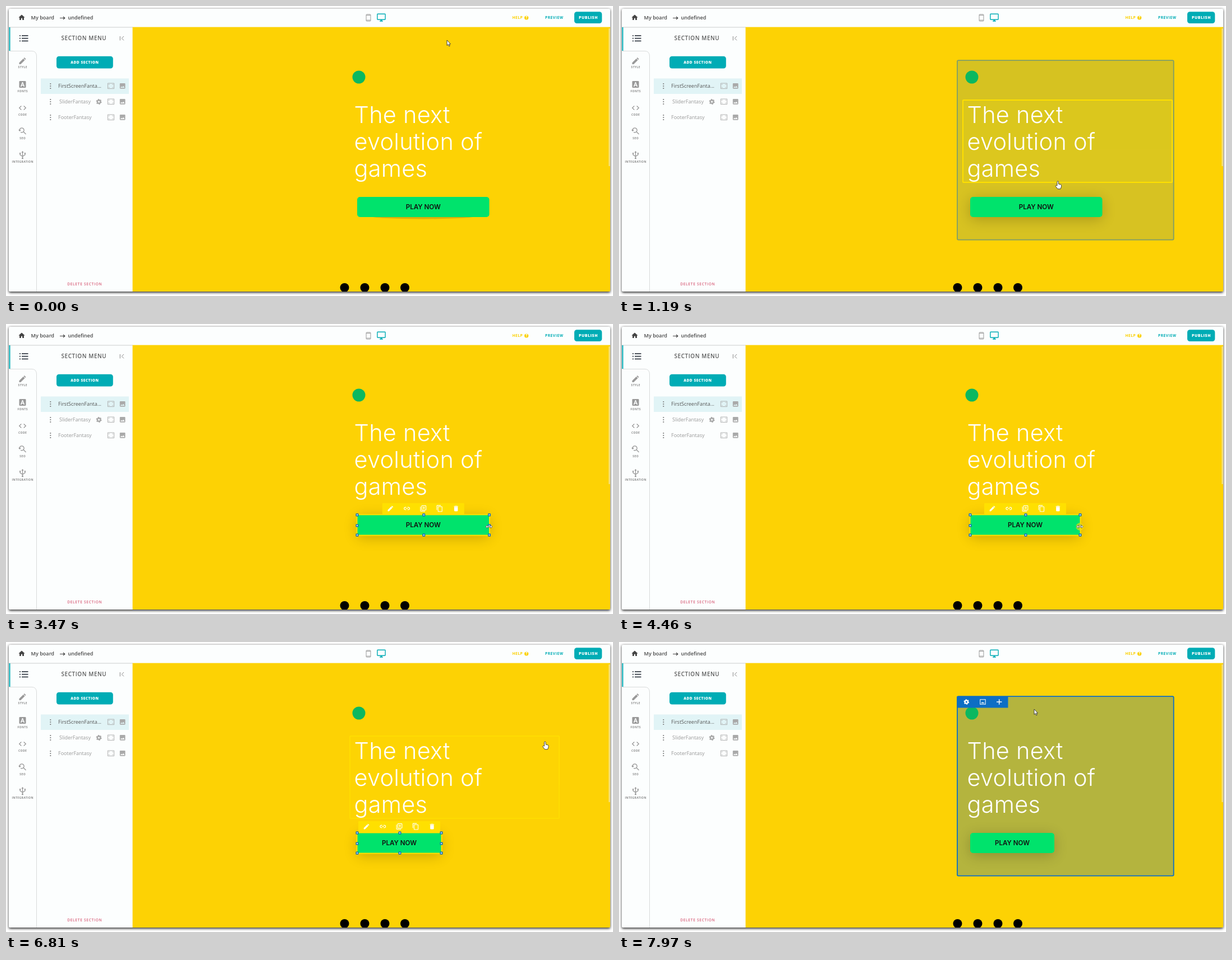
An HTML page for the animation above (8000 ms loop, 1082x518 px).

```html
<!DOCTYPE html>
<html lang="en">
<head>
<meta charset="utf-8">
<title>Section editor</title>
<style>
  html, body { margin: 0; width: 100%; height: 100%; overflow: hidden; background: #fff; }
  svg { display: block; }
  #stage { width: 100%; height: 100%; }
  text { font-family: "Open Sans", sans-serif; }
  .mont { font-family: Inter, sans-serif; }
</style>
</head>
<body>
<svg id="stage" viewBox="0 0 1082 518"></svg>
<script>
const TEAL = '#00acb5', BLUE = '#0d6ec4', GREY = '#999', LEMON = '#ffe000';

// Icons on a 24-unit grid; "F" paths are filled, "S" paths are stroked.
const F = d => `<path d="${d}" fill="currentColor" fill-rule="evenodd"/>`;
const S = (d, w = 2) => `<path d="${d}" fill="none" stroke="currentColor" stroke-width="${w}"/>`;
const ring = (r, w, dash = '') =>
  `<circle cx="12" cy="12" r="${r}" fill="none" stroke="currentColor" stroke-width="${w}" stroke-dasharray="${dash}"/>`;
const icons = {
  home: F('M10 20v-6h4v6h5v-8h3L12 3 2 12h3v8z'),
  phone: S('M7 2h10a1.500 1.500 0 0 1 1.500 1.500v17a1.500 1.500 0 0 1-1.500 1.500H7a1.500 1.500 0 0 1-1.500-1.500v-17A1.500 1.500 0 0 1 7 2zM5.500 4.500h13M5.500 19h13', 1.6),
  desktop: F('M21 2H3a2 2 0 0 0-2 2v12a2 2 0 0 0 2 2h7v2H8v2h8v-2h-2v-2h7a2 2 0 0 0 2-2V4a2 2 0 0 0-2-2zm0 14H3V4h18z'),
  pencil: F('M3 17v4h4L18 10l-4-4zM21 7l-4-4-2 2 4 4z'),
  fonts: F('M5 3h14a2 2 0 0 1 2 2v14a2 2 0 0 1-2 2H5a2 2 0 0 1-2-2V5a2 2 0 0 1 2-2zM11 6 6.5 18H9l1-2.7h4l1 2.7h2.5L13 6zM10.6 13.2 12 9l1.4 4.2z'),
  code: F('M9.4 16.6 4.8 12l4.6-4.6L8 6l-6 6 6 6zM14.6 16.6l4.6-4.6-4.6-4.6L16 6l6 6-6 6z'),
  search: S('M4 11a6 6 0 1 1 3 4.5M14 14l7 7M2 9l2 3 3-2'),
  plug: S('M12 4v17M5.500 8v4l6.500 4M18.500 8v4l-6.500 4') + F('M9 6l3-5 3 5zM4 6h3v4H4zM17 6h3v4h-3zM10 19h4v4h-4z'),
  image: F('M21 19V5a2 2 0 0 0-2-2H5a2 2 0 0 0-2 2v14a2 2 0 0 0 2 2h14a2 2 0 0 0 2-2zM8.5 13.500l2.500 3 3.500-4.500 4.500 6H5z'),
  picture: S('M3 4h18v16H3z') + F('M6 17l4-5 2.500 3 2-2 3.500 4z'),
  gear: ring(9, 4, '4.71') + ring(6, 5),
  plus: S('M12 3v18M3 12h18', 2.6),
  expand: S('M2 3.500h20v17H2z', 1.6) + S('M5 9V7h3M16 7h3v2M19 15v2h-3M8 17H5v-2', 1.2),
  link: S('M10 8H7a4 4 0 0 0 0 8h3M14 8h3a4 4 0 0 1 0 8h-3M8 12h8'),
  duplicate: F('M2 6v14a2 2 0 0 0 2 2h14v-2H4V6zM8 2h12a2 2 0 0 1 2 2v12a2 2 0 0 1-2 2H8a2 2 0 0 1-2-2V4a2 2 0 0 1 2-2zm0 2v12h12V4zM13 6h2v3h3v2h-3v3h-2v-3h-3V9h3z'),
  copy: F('M16 1H4a2 2 0 0 0-2 2v14h2V3h12zm3 4H8a2 2 0 0 0-2 2v14a2 2 0 0 0 2 2h11a2 2 0 0 0 2-2V7a2 2 0 0 0-2-2zm0 16H8V7h11z'),
  trash: F('M6 19a2 2 0 0 0 2 2h8a2 2 0 0 0 2-2V7H6zM19 4h-3.500l-1-1h-5l-1 1H5v2h14z')
};
const icon = (name, x, y, size, color) =>
  `<g color="${color}" transform="translate(${x - size / 2} ${y - size / 2}) scale(${size / 24})">${icons[name]}</g>`;
const rect = (x, y, w, h, fill, rx = 0, more = '') =>
  `<rect x="${x}" y="${y}" width="${w}" height="${h}" fill="${fill}" rx="${rx}" ${more}/>`;
const circle = (x, y, r, fill) => `<circle cx="${x}" cy="${y}" r="${r}" fill="${fill}"/>`;
const line = (d, color, w) => `<path d="${d}" fill="none" stroke="${color}" stroke-width="${w}"/>`;
const text = (s, x, y, size, fill, { weight = 400, gap = 0, anchor = 'start', cls = '' } = {}) =>
  `<text x="${x}" y="${y}" font-size="${size}" fill="${fill}" font-weight="${weight}" letter-spacing="${gap}" text-anchor="${anchor}" class="${cls}">${s}</text>`;
const mid = (weight, gap) => ({ weight, gap, anchor: 'middle' });

const header =
  icon('home', 28, 20.5, 13.5, '#444') +
  text('My board', 44.5, 24.3, 9.1, '#484848', { weight: 600 }) +
  line('M96 21.500h8.500M102 19l2.800 2.500-2.800 2.500', '#444', 1.2) +
  text('undefined', 110.5, 24.3, 9.1, '#484848', { weight: 600 }) +
  icon('phone', 646, 21, 14.5, GREY) + icon('desktop', 669, 20.7, 17, TEAL) +
  text('HELP', 902.5, 23.4, 6.8, '#fbd000', { weight: 700, gap: .4 }) +
  circle(927.7, 21, 3.6, '#fbd000') + text('?', 927.7, 23.2, 6, '#fff', mid(800, 0)) +
  text('PREVIEW', 961, 23.1, 6.5, TEAL, { weight: 700, gap: .6 }) +
  rect(1013, 10.2, 49.3, 20.8, TEAL, 4.5) + text('PUBLISH', 1038, 23.3, 6.9, '#fff', mid(800, .6));

const rail = [
  ['pencil', 98, 'STYLE', 111.3], ['fonts', 140, 'FONTS', 154], ['code', 182, 'CODE', 196],
  ['search', 223, 'SEO', 237.5], ['plug', 266, 'INTEGRATION', 280]
].map(([name, y, label, base]) =>
  icon(name, 29.5, y, 16, GREY) + text(label, 29.7, base, 5, '#888', mid(700, .4))).join('');

const rows = [[143, 'FirstScreenFanta...', 93, '#555'], [171, 'SliderFantasy', 95, GREY], [199, 'FooterFantasy', 93, GREY]]
  .map(([y, label, x, color]) =>
    [-4, 0, 4].map(d => circle(79.3, y + d, 1.1, '#777')).join('') +
    text(label, x, y + 3.3, 9, color) +
    icon('expand', 187, y - .2, 13.5, '#aaa') + icon('image', 207.7, y - .2, 13, '#aaa')).join('');

const panel =
  rect(5, 37, 221, 2, '#e4e6e6') + rect(5.5, 38, 2, 42, TEAL) +
  line('M6 80.500H46Q54.500 80.500 54.500 90V510', '#d8dada', 1) +
  [53, 57.7, 62.4].map(y => rect(24, y - .9, 2, 1.9, '#444b54') + rect(28, y - .9, 11.5, 1.9, '#444b54')).join('') +
  rail +
  text('SECTION MENU', 98.5, 60.7, 9.9, '#5a5a5a', { weight: 600, gap: .6 }) +
  line('M203.300 54v7.500M210 54l-3.700 3.700 3.700 3.700', '#888', 1) +
  rect(90, 89.8, 100.8, 21.8, TEAL, 4.5) + text('ADD SECTION', 140.4, 102.9, 6.6, '#fff', mid(800, .5)) +
  rect(62, 129.5, 157, 27.5, '#e1f4f6') + rows + icon('gear', 165.6, 171, 11, '#aaa') +
  text('DELETE SECTION', 140.3, 499.3, 6.6, '#d8607a', mid(600, .7));

const headline = ['The next', 'evolution of', 'games']
  .map((s, i) => text(s, 620.5, 208.5 + i * 48.4, 41.5, '#fff', { weight: 330, gap: .25, cls: 'mont' })).join('');

const page =
  rect(225.6, 37.6, 852, 473, '#fdd204') + rect(1074.5, 40, 2, 246, '#f3e39a') +
  [603.5, 639.5, 675.5, 711].map(x => circle(x, 503, 8, '#000')).join('') +
  `<g id="box">${rect(603, 97.2, 385.7, 320.4, BLUE, 2, `fill-opacity=".3" stroke="${BLUE}" stroke-width="1.8"`)}</g>
   <g id="title">${rect(613, 168, 373, 147, LEMON, 1, `fill-opacity=".12" stroke="${LEMON}" stroke-width="2"`)}</g>` +
  circle(629, 127, 11.5, '#0bb860') + headline +
  `<g id="boxTools">${rect(602.5, 97, 91, 20.5, BLUE)}
    ${icon('gear', 619.3, 107, 10.5, '#fff')}${icon('picture', 648.5, 107, 12.5, '#fff')}${icon('plus', 677.7, 107, 12.5, '#fff')}</g>
   <ellipse id="edge" cx="743" cy="375.500" rx="93" ry="5" fill="#dcae08"/>` +
  rect(626, 345, 0, 37, '#000', 5, 'id="shade" filter="url(#soft)" opacity=".2"') +
  rect(626, 341, 0, 36, '#00e36c', 5, 'id="button"') +
  text('PLAY NOW', 0, 363.2, 11.6, '#111', { ...mid(600, 0), cls: 'mont' }).replace('<text', '<text id="label"') +
  rect(625.5, 340.5, 0, 37, 'none', 0, `id="frame" stroke="${LEMON}" stroke-width="2"`) +
  `<g id="tools">${rect(-73, 320, 146, 20, LEMON, 1)}
    ${['pencil', 'link', 'duplicate', 'copy', 'trash'].map((n, i) => icon(n, (i - 2) * 29.2, 329.5, 13, '#fff')).join('')}</g>
   <path id="grips" fill="#d9f2ff" stroke="${BLUE}" stroke-width="1.500"/>`;

const cursors = `<g id="cursor">
  <circle id="press" r="6.800" fill="#ffe000" opacity=".65"/>
  <g fill="#fff" stroke="#333" stroke-width=".9" stroke-linejoin="round">
    <path id="arrow" d="M0 0V9.500l2.200-2 1.500 3.400 1.600-.7-1.500-3.200h2.700z"/>
    <path id="hand" d="M-1.500 8V1.300a1.300 1.300 0 0 1 2.600 0V5l3.900 1a1.500 1.500 0 0 1 1 1.500v2.300l-1.500 4h-5L-4 9.300a1.100 1.100 0 0 1 1.500-1.600z"/>
    <path id="sizer" d="M-6 0l3-3v2h6v-2l3 3-3 3v-2h-6v2z" fill="#ddd" stroke="#555" stroke-width=".7"/>
  </g></g>`;

document.getElementById('stage').innerHTML = `
  <defs>
    <filter id="soft" x="-30%" y="-150%" width="160%" height="400%"><feGaussianBlur stdDeviation="12"/></filter>
    <filter id="rim" x="-5%" y="-5%" width="110%" height="110%"><feGaussianBlur stdDeviation="2"/></filter>
    <clipPath id="win">${rect(5, 5, 1072, 505, '#000', 2)}</clipPath>
  </defs>
  ${rect(5, 6, 1072, 506, '#333', 2, 'filter="url(#rim)"')}
  <g clip-path="url(#win)">${rect(5, 5, 1072, 505, '#fcfefe')}${header}${panel}${page}</g>${cursors}`;

const el = Object.fromEntries([...document.querySelectorAll('#stage [id]')].map(n => [n.id, n]));
const show = (node, on) => node.style.display = on ? '' : 'none';
const set = (node, key, value) => node.setAttribute(key, value);

// Linear track through [time, value, value...] keys.
function track(keys, t) {
  const i = keys.findIndex(k => k[0] > t);
  if (i < 0) return keys[keys.length - 1].slice(1);
  if (!i) return keys[0].slice(1);
  const a = keys[i - 1], b = keys[i], u = (t - a[0]) / (b[0] - a[0]);
  return a.slice(1).map((v, j) => v + (b[j + 1] - v) * u);
}

const pointer = [
  [680, 786, 61], [750, 784, 76], [820, 777, 118], [960, 761, 212], [1170, 782.5, 313],
  [1310, 789, 345], [1450, 789, 350], [1888, 789, 350], [2192, 834, 360], [2420, 854, 364],
  [2480, 854, 364], [2600, 860, 363], [3400, 860, 363], [3470, 861, 362], [6050, 775.5, 362],
  [6190, 835, 306], [6400, 950, 196], [6732, 950, 196], [6810, 961, 178], [6966, 1002, 132],
  [7200, 1024, 109], [7745, 1024, 109], [7820, 930, 112], [7970, 740, 120]
];
const rightEdge = [[4073, 861.5], [4458, 822], [4920, 783], [5010, 779], [5080, 776]];
const boxFade = [[750, 0], [820, .7], [890, .8], [960, .73], [1170, .52], [1310, .2], [1380, 0], [7745, 0], [7820, .55], [7970, 1]];
const titleFade = [[890, 0], [960, .2], [1170, 1], [1240, .8], [1380, 0], [6260, 0], [6400, .75], [6888, .75], [7044, 0]];

// Motion advances in steps: [start, step length].
const beats = [[0, 70], [750, 70], [1660, 76], [2540, 60], [2850, 60], [3470, 70], [4150, 77],
  [5010, 70], [6120, 70], [6810, 78], [7820, 75]];
function stepped(t) {
  const [start, len] = beats.filter(b => b[0] <= t).pop();
  return start + Math.floor((t - start) / len) * len;
}

function draw(now) {
  const time = now % 8000, t = stepped(time);
  const within = (a, b) => t >= a && t < b;
  const [right] = track(rightEdge, t), width = right - 626, center = 626 + width / 2;

  set(el.box, 'opacity', track(boxFade, t)[0]);
  set(el.title, 'opacity', track(titleFade, t)[0]);
  show(el.boxTools, within(820, 1030) || t >= 7820);

  const selected = within(1660, 7122);
  show(el.edge, t < 820);
  show(el.shade, t >= 820);
  show(el.frame, within(1380, 7122));
  show(el.tools, selected);
  show(el.grips, selected);
  for (const n of [el.button, el.shade]) set(n, 'width', width);
  set(el.button, 'rx', selected ? 0 : 5);
  set(el.frame, 'width', width + 1);
  set(el.label, 'x', center);
  set(el.tools, 'transform', `translate(${center} 0)`);
  const spots = [626, center + 1, right].flatMap(x => [341, 360, 377].map(y => [x, y]));
  spots.splice(4, 1);
  set(el.grips, 'd', spots.map(([x, y]) => `M${x - 1.7} ${y - 1.7}h3.4v3.4h-3.4z`).join(''));

  const sizing = time >= 3470 && time < 6120;
  let [x, y] = track(pointer, t);
  if (sizing) [x, y] = [right - .5, 362];
  const pointing = y > 300 || (x > 612 && x < 986 && y > 167);
  set(el.cursor, 'transform', `translate(${x} ${y})`);
  show(el.press, time >= 4000 && time < 5470);
  show(el.sizer, sizing);
  show(el.hand, !sizing && pointing);
  show(el.arrow, !sizing && !pointing);
}

let begin;
function tick(now) {
  begin ??= now;
  draw(now - begin);
  requestAnimationFrame(tick);
}
draw(0);
requestAnimationFrame(tick);
</script>
</body>
</html>
```
